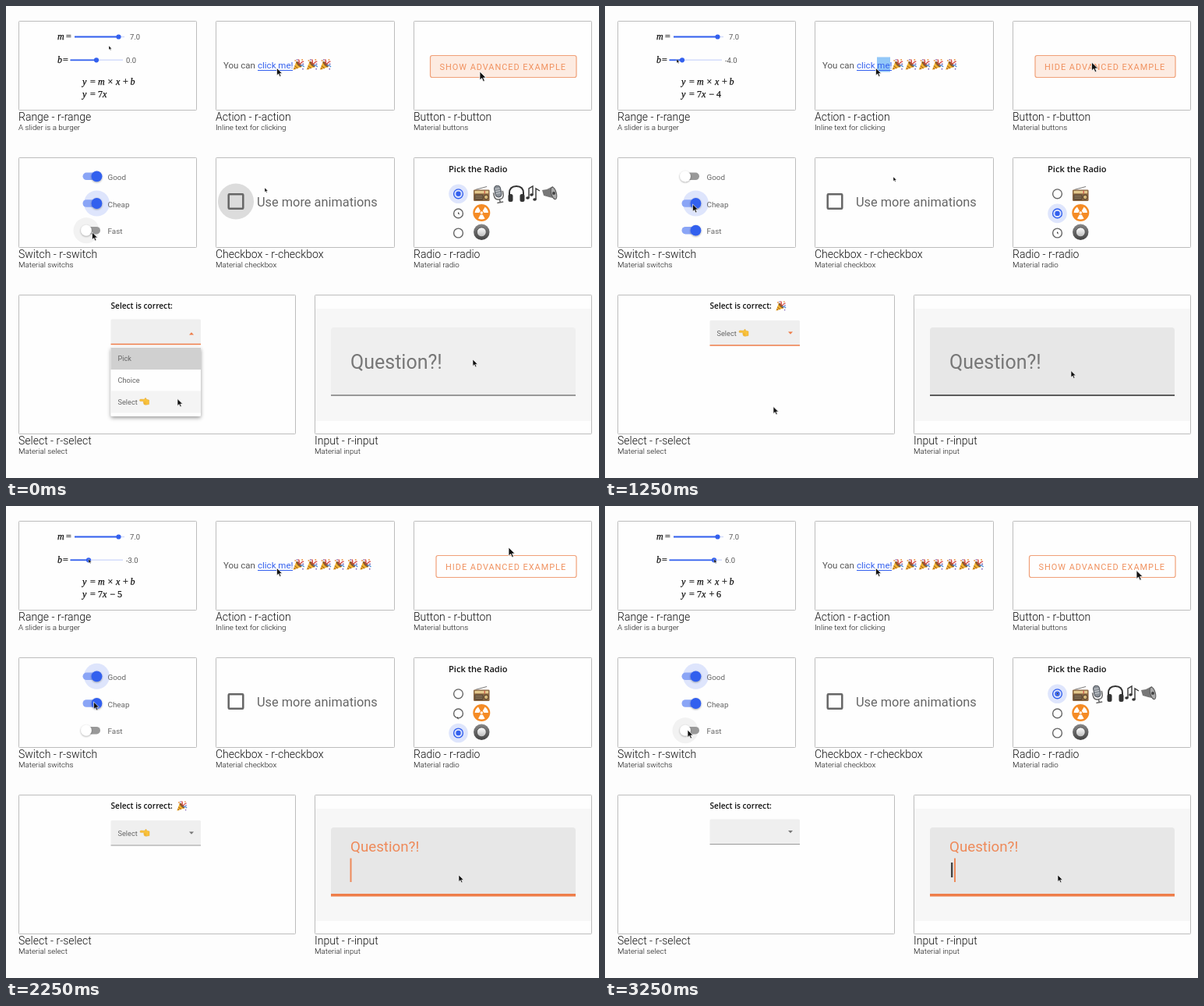
Recreate the animation shown at these times as an HTML page. Size 761x605 px, loop 3.5 s.

```html
<!DOCTYPE html>
<html lang="en">
<head>
<meta charset="utf-8">
<title>Components</title>
<style>
html, body { margin: 0; width: 100%; height: 100%; overflow: hidden; background: #fdfdfd; }
svg { display: block; width: 761px; height: 605px; font-family: Roboto, sans-serif; }
text { white-space: pre; }
.title { font-size: 14px; font-weight: 300; fill: #111; }
.sub { font-size: 9.8px; font-weight: 300; fill: #111; }
.card { fill: #fefefe; stroke: #bdbdbd; }
.head { font-family: "Open Sans", "Noto Sans", sans-serif; font-weight: 600; fill: #111; }
.math { font: 12px "Liberation Serif", serif; fill: #111; stroke: #111; stroke-width: .25px; }
.math .i { font-style: italic; }
.value { font-size: 9.4px; fill: #555; }
.label { font-size: 9.9px; fill: #666; }
.option { font-size: 9.2px; fill: #666; }
</style>
</head>
<body>
<svg viewBox="0 0 761 605" xmlns="http://www.w3.org/2000/svg">
  <defs>
    <path id="cursor" d="M0 0V10L2.4 7.8 4 11.5 5.8 10.8 4.2 7.3H7.4Z" fill="#111" stroke="#fff" stroke-width=".7"/>
    <g id="party">
      <path d="M1 15 5 4Q10 6 12 11Z" fill="#f2b632"/>
      <path d="M3 9.5 7 13M2 12.500 4 14" stroke="#b06a20" stroke-width="1.2"/>
      <ellipse cx="8.500" cy="7.500" rx="1.900" ry="4.800" transform="rotate(-44 8.500 7.500)" fill="#8c5a2c"/>
      <path d="M8 7Q10 4 8 1M10 8Q12 4 15 4" fill="none" stroke="#d4453f" stroke-width="1.3"/>
      <path d="M10 9Q13 8 15.500 11" fill="none" stroke="#4a8fd8" stroke-width="1.3"/>
      <path d="M3 2h1.800v1.600H3zM12 1h1.800v1.600H12z" fill="#e88a2e"/>
      <path d="M5.500 1h1.500v1.500H5.500zM13 6.500h2V8h-2zM13 13h1.500v1.500H13z" fill="#7a5bb0"/>
    </g>
    <g id="hand" fill="#f9c23c" stroke="#dc9a22" stroke-width=".4">
      <path d="M0 3.300Q0 2 1.500 2L6 2.200 7 .6Q8.500 0 8.300 1.600L9.500 2.400 12 3V8.500L8 9.300Q5 9.500 5 7L4.700 4.600H1Q0 4.500 0 3.300Z"/>
      <path d="M5 6h3M5.500 7.600h2.500" fill="none"/>
    </g>
    <g id="boombox">
      <path d="M3 5 18 1" stroke="#777"/>
      <rect x=".5" y="5" width="21" height="15" rx="1.500" fill="#8b6742"/>
      <path d="M2 6.500H20V10H2Z" fill="#e3c98d"/>
      <path d="M2 11.500H13V18.500H2Z" fill="#594735"/>
      <path d="M3 13.500h9M3 16h9" stroke="#a8926f"/>
      <circle cx="17" cy="14.800" r="2.900" fill="#d5b676" stroke="#4b3b2c"/>
      <path d="M15 6.500V10" stroke="#c33"/>
    </g>
    <g id="extras">
      <g transform="rotate(-12 632 241)">
        <path d="M626 238v4q0 6 6 6t6-6v-4M632 248v4M628 252h8" fill="none" stroke="#666" stroke-width="1.500"/>
        <rect x="628" y="230" width="8" height="15" rx="4" fill="#8b9198" stroke="#4b5057"/>
        <path d="M629 234h6M629 237h6M629 240h6" stroke="#d4d8dc" stroke-width=".8"/>
      </g>
      <path d="M646 246V240Q646 231 655 231T664 240V246" fill="none" stroke="#333" stroke-width="2"/>
      <rect x="644.500" y="241" width="6" height="10" rx="2.500" fill="#333"/>
      <rect x="659.500" y="241" width="6" height="10" rx="2.500" fill="#333"/>
      <path d="M671 246V234L676 231V242M680 248V234L685 237" fill="none" stroke="#333" stroke-width="1.400"/>
      <g fill="#333"><ellipse cx="669.500" cy="246" rx="2.300" ry="1.800"/><ellipse cx="674.500" cy="242" rx="2.300" ry="1.800"/><ellipse cx="678.500" cy="248" rx="2.300" ry="1.800"/></g>
      <path d="M688 236 694 235 702 231 706 247 697 245 690 243Z" fill="#777"/>
      <ellipse cx="703" cy="240" rx="3.300" ry="8" transform="rotate(-16 703 240)" fill="#aaa" stroke="#555"/>
      <circle cx="703" cy="240" r="2" fill="#444"/>
    </g>
    <linearGradient id="steel" x2="0" y2="1"><stop stop-color="#888"/><stop offset="1" stop-color="#444"/></linearGradient>
    <linearGradient id="knob" x2="0" y2="1"><stop stop-color="#fff"/><stop offset="1" stop-color="#bbb"/></linearGradient>
    <filter id="shadow" x="-20%" y="-20%" width="140%" height="140%"><feDropShadow dx="0" dy="2" stdDeviation="2.500" flood-opacity=".4"/></filter>
    <filter id="soft" x="-50%" y="-50%" width="200%" height="200%"><feDropShadow dx="0" dy=".8" stdDeviation=".8" flood-opacity=".4"/></filter>
  </defs>
  <g id="cards"></g>
  <g id="scene"></g>
</svg>
<script>
const BLUE = '#3360ee', ORANGE = '#ee7d49', GREY = '#666';

const rect = (x, y, w, h, fill, more = '') =>
  `<rect x="${x}" y="${y}" width="${w}" height="${h}" fill="${fill}" ${more}/>`;
const circle = (x, y, r, fill, more = '') => `<circle cx="${x}" cy="${y}" r="${r}" fill="${fill}" ${more}/>`;
const line = (x1, x2, y, color, width) =>
  `<path d="M${x1} ${y}H${x2}" stroke="${color}" stroke-width="${width}"/>`;
const text = (x, y, str, cls = '', more = '') => `<text x="${x}" y="${y}" class="${cls}" ${more}>${str}</text>`;
const use = (id, x, y, scale = 1) =>
  `<use href="#${id}" transform="translate(${x} ${y}) scale(${scale})"/>`;
const cursor = (pos, scale) => pos ? use('cursor', ...pos, scale) : '';

// Value of the last [step, value] entry that has begun.
const at = (table, step) => table.reduce((value, [from, next]) => step >= from ? next : value, null);

// Lays out [x, token] pairs; letters are set in italics.
const math = (y, tokens) => tokens.map(([x, s]) => text(x, y, s, /[a-z]/.test(s) ? 'i' : '')).join('');

const CARDS = [
  [16, 19, 228, 114, 'Range - r-range', 'A slider is a burger'],
  [269, 19, 229, 114, 'Action - r-action', 'Inline text for clicking'],
  [523, 19, 228, 114, 'Button - r-button', 'Material buttons'],
  [16, 194, 228, 115, 'Switch - r-switch', 'Material switchs'],
  [269, 194, 229, 115, 'Checkbox - r-checkbox', 'Material checkbox'],
  [523, 194, 228, 115, 'Radio - r-radio', 'Material radio'],
  [16, 370, 355, 178, 'Select - r-select', 'Material select'],
  [396, 370, 355, 178, 'Input - r-input', 'Material input']
];

// [step, [thumb x, shown value, equation offset, cursor]]
const RANGE = [
  [0, [116, 0, 0, [132, 51]]],
  [1, [116, 0, 0, [114, 67]]],
  [3, [109, -2, -2, [106, 68]]],
  [4, [99, -4, -4, [92, 68]]],
  [5, [88, -8, -8, [84, 68]]],
  [6, [82.5, -10, -10, [79, 67]]],
  [7, [92, -7, -7, [91, 68]]],
  [8, [106, -3, -5, [106, 68]]],
  [9, [122, 1, 1, [121, 68]]],
  [10, [136.500, 4, 4, [135, 68]]],
  [11, [140, 6, 6, [140, 68]]]
];

function range(step) {
  const [thumb, value, offset, pos] = at(RANGE, step);
  const slider = (x, y, left, right) =>
    line(left, right, y, '#d3dcfb', 1.6) + line(left, x, y, BLUE, 1.8) + circle(x, y, 3.1, BLUE);
  const sum = [[98, 'y'], [108, '='], [118, '7'], [124, 'x']];
  if (offset) sum.push([133.5, offset < 0 ? '−' : '+'], [143, String(Math.abs(offset))]);
  return `<g class="math">${math(43, [[66, 'm'], [77, '=']])}${math(73, [[66, 'b'], [73, '=']])}
    ${math(101, [[98, 'y'], [108, '='], [118, 'm'], [130.500, '×'], [141, 'x'], [150, '+'], [159.500, 'b']])}
    ${math(117, sum)}</g>` +
    slider(144.500, 39.500, 88, 152) + text(159, 43, '7.0', 'value') +
    slider(thumb, 69.300, 82.500, 150) + text(154, 72.700, value.toFixed(1), 'value') + cursor(pos, .5);
}

function action(step) {
  const count = at([[0, 3], [2, 4], [4, 5], [8, 6], [12, 7]], step);
  const size = 'font-size="11.5"';
  let out = step >= 4 && step <= 7 ? rect(349, 65.500, 17, 19, '#93c8f8') : '';
  out += text(279, 79.500, 'You can', '', size + ' fill="#555"') +
    text(323, 79.500, 'click me!', '', size + ` fill="${BLUE}"`) + line(323, 368, 82.500, BLUE, 1);
  for (let i = 0; i < count; i++) out += use('party', 367.500 + 17.150 * i, 67.300, .98);
  return out + cursor([347.500, 79.500], .95);
}

function button(step) {
  const hide = step >= 3 && step < 12;
  const left = hide ? 552 : 544.500;
  const pos = at([[0, [608, 84]], [3, [614, 80]], [4, [624.500, 72]], [5, [645, 57.500]],
    [8, [645, 53]], [9, null], [12, [682, 82.500]]], step);
  return rect(left, 63.500, 732 - left, 28, step < 7 ? '#fdebe1' : '#fefefe', 'rx="2.500" stroke="#f0a078" stroke-width="1.200"') +
    text(hide ? 564 : 556.500, 81.800, (hide ? 'HIDE' : 'SHOW') + ' ADVANCED EXAMPLE', '',
      'font-size="10.95" letter-spacing=".978" fill="#f0915f"') + cursor(pos, 1.1);
}

// One letter per switch: n = on, f = off, capital = with halo.
function switches(step) {
  const states = at([[0, 'nNF'], [1, 'nnN'], [2, 'nfN'], [3, 'nFn'], [4, 'fNn'], [5, 'FNn'],
    [7, 'Nnf'], [9, 'NnF']], step);
  const pos = at([[0, [110.500, 290]], [1, [113, 284]], [2, [113, 274.500]], [3, [112, 255]], [4, [112.500, 254]],
    [5, [110.500, 217]], [7, [113, 224]], [8, [112.500, 251]], [9, [106, 287]]], step);
  return ['Good', 'Cheap', 'Fast'].map((name, i) => {
    const y = 218.300 + 34.700 * i, state = states[i], on = /n/i.test(state), x = on ? 116.500 : 103;
    return (state < 'a' ? circle(x, y, 16.500, on ? '#dee5fc' : '#f2f2f2') : '') +
      rect(on ? 98.500 : 101, y - 4.800, on ? 23 : 20, 9.600, on ? '#8aa5f6' : '#999', 'rx="4.800"') +
      circle(x, y, 6.900, on ? BLUE : '#fff', 'filter="url(#soft)"') + text(130.500, y + 4.500, name, 'label');
  }).join('') + cursor(pos, .95);
}

function checkbox(step) {
  const halo = at([[0, '#dcdcdc'], [1, '#f3f3f3'], [2, 'none']], step);
  const pos = at([[0, [332, 233]], [3, [348, 227]], [4, [370, 219]], [5, null]], step);
  return circle(295, 250.500, 23, halo) +
    rect(285.700, 241.200, 18.600, 18.600, 'none', `rx="1" stroke="${GREY}" stroke-width="2.500"`) +
    text(322, 256.500, 'Use more animations', '', 'font-size="16.35" fill="#666"') + cursor(pos, .55);
}

function radio(step) {
  const selected = at([[0, 0], [1, 1], [6, 2], [10, 1], [11, 0]], step);
  const pos = at([[0, [580, 264]], [1, null], [4, [580, 289]], [6, [580, 290]], [7, null], [8, [579, 270]],
    [9, null], [10, [579, 245]], [11, [580, 239]]], step);
  let out = text(568, 213, 'Pick the Radio', 'head', 'font-size="11.1"');
  for (let i = 0; i < 3; i++) {
    const y = 240.800 + 25.100 * i, on = i === selected;
    out += (on ? circle(580.500, y, 12.300, '#dee5fc') : '') +
      circle(580.500, y, 5.900, 'none', `stroke="${on ? BLUE : GREY}" stroke-width="1.400"`) +
      (on ? circle(580.500, y, 3.200, BLUE) : '');
  }
  out += use('boombox', 599.500, 230.500, .98) + circle(610.300, 265, 11, '#f58b25');
  for (const turn of [0, 120, 240])
    out += `<path d="M608.800 262.400 606 257.500Q610.300 255.500 614.600 257.500L611.800 262.400Z" fill="#fff" transform="rotate(${turn + 60} 610.300 265)"/>`;
  out += circle(610.300, 265, 1.700, '#fff') +
    circle(610.300, 289.800, 10.200, 'url(#steel)') + circle(610.300, 289.800, 6, 'url(#knob)', 'stroke="#555"');
  return out + (selected === 0 ? '<use href="#extras"/>' : '') + cursor(pos, .3);
}

function select(step) {
  const open = step === 0, chosen = step > 0 && step < 11, active = step < 7;
  const top = chosen ? 403 : 401.500;
  const pos = at([[0, [220, 503.500]], [1, [216, 513.500]], [6, null]], step);
  const accent = active ? ORANGE : '#777';
  const arrow = step < 3 ? 'l3-3.200 3 3.200z' : 'l3 3.200 3-3.200z';
  let out = text(134.500, chosen ? 388 : 387.500, 'Select is correct:', 'head', 'font-size="10.15"') +
    rect(134.500, top, 115.500, 32, '#efefef', 'rx="1.500"') +
    line(134.500, 250, top + 32, active ? ORANGE : '#999', active ? 1.600 : 1) +
    `<path d="M235 ${top + (step < 3 ? 20 : 14.500)}${arrow}" fill="${accent}"/>`;
  if (chosen) out += use('party', 218.500, 377.500, .88) + text(143.500, 422.500, 'Select', 'option') + use('hand', 172, 414);
  if (open) {
    out += rect(134.500, 437.500, 115.500, 88.500, '#fefefe', 'rx="2" filter="url(#shadow)"') +
      rect(134.500, 438, 115.500, 28, '#d0d0d0') + rect(134.500, 493.500, 115.500, 28, '#f4f4f4');
    ['Pick', 'Choice', 'Select'].forEach((name, i) => out += text(143.500, 455.300 + 27.800 * i, name, 'option'));
    out += use('hand', 171.500, 502);
  }
  return out + cursor(pos, .9);
}

function input(step) {
  const focused = step >= 8, moving = step === 7;
  const pos = at([[0, [599, 453]], [3, [599.500, 460]], [4, [598, 467.500]], [5, [581, 473]]], step);
  const [y, size, color] = focused ? [443, 18.750, '#ee8a5a'] : moving ? [454, 22, '#b98368'] : [464.500, 25, '#777'];
  let out = rect(397, 388, 354, 144, '#f7f7f7') +
    `<path d="M417 500V416Q417 412 421 412H727Q731 412 731 416V500Z" fill="${step ? '#e7e7e7' : '#efefef'}"/>` +
    line(417, 731, 499, step ? '#5c5c5c' : '#999', 2);
  if (moving) out += line(462, 700, 498.500, ORANGE, 3);
  if (focused) out += line(417, 731, 498.700, ORANGE, 3.400);
  out += text(442, y, 'Question?!', '', `font-size="${size}" fill="${color}"`);
  if (step === 12) out += text(441.800, 475.500, 'I', '', 'font-size="25" fill="#444"');
  if (step === 8 || step >= 11) out += rect(step === 12 ? 448 : 441.500, 451.500, 2, 30.500, '#ee8a5a');
  return out + cursor(pos, .85);
}

document.getElementById('cards').innerHTML = CARDS.map(([x, y, w, h, title, sub]) =>
  rect(x + .5, y + .5, w, h, '', 'class="card" rx=".8"') +
  text(x, y + h + 14, title, 'title') + text(x, y + h + 26, sub, 'sub')).join('');

const scene = document.getElementById('scene');
const parts = [range, action, button, switches, checkbox, radio, select, input];
const start = performance.now();
let shown = -1;

function draw(now) {
  const time = Math.max(0, now - start) % 3500;
  const step = Math.max(0, Math.floor(time / 250) - 1);
  if (step !== shown) {
    scene.innerHTML = parts.map(part => part(step)).join('');
    shown = step;
  }
  requestAnimationFrame(draw);
}
draw(start);
</script>
</body>
</html>
```
